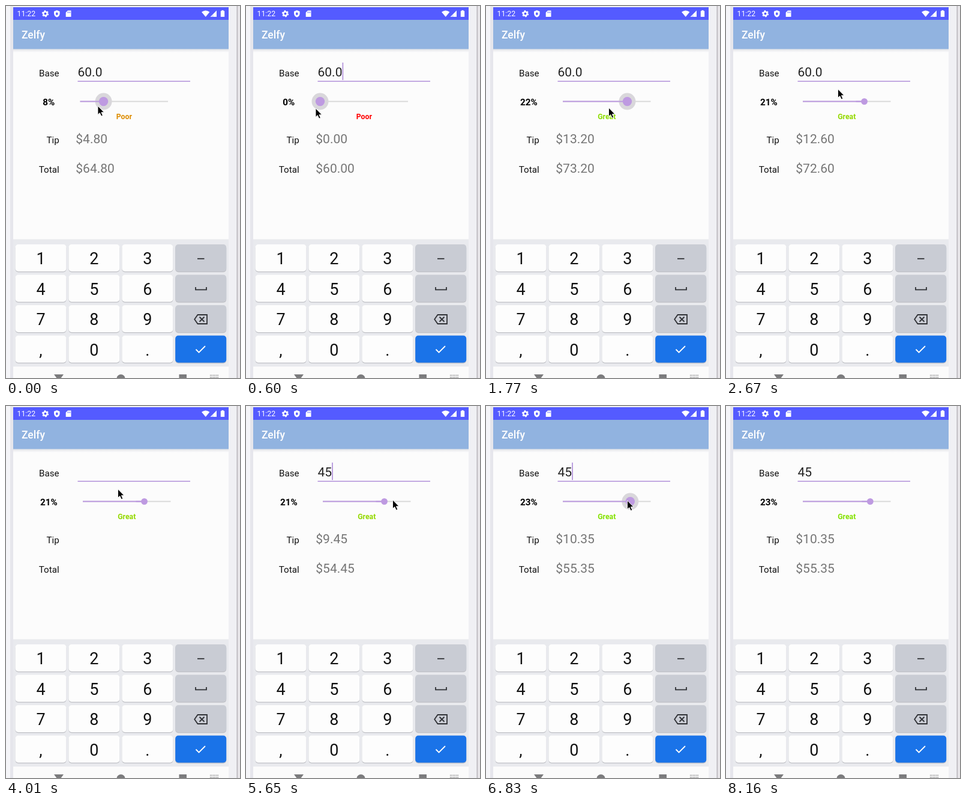
An HTML page for the animation above (8440 ms loop, 390 by 618 pixels).

```html
<!DOCTYPE html>
<html lang="en">
<head>
<meta charset="utf-8">
<title>Tip calculator</title>
<style>
html, body { margin: 0; width: 100%; height: 100%; overflow: hidden; background: #ececf1; }
svg { display: block; width: 390px; height: 618px; font-family: Roboto, sans-serif; }
.label { font-size: 15.2px; text-anchor: end; fill: #111; }
.value { font-size: 21px; fill: #757575; }
.bold { font-weight: 700; text-anchor: middle; }
.digit { font-size: 27px; text-anchor: middle; fill: #111; }
</style>
</head>
<body>
<svg viewBox="0 0 390 618">
  <defs>
    <linearGradient id="shade" x2="0" y2="1">
      <stop stop-color="#dfe1e6"/><stop offset="1" stop-color="#fcfcfc"/>
    </linearGradient>
  </defs>

  <!-- device edges and screen -->
  <rect width="390" height="618" fill="#f0f0f4"/>
  <rect width="7" height="618" fill="#f5f5f8"/>
  <rect x="7" width="5" height="618" fill="#e6e6ec"/>
  <rect x="384.5" width="2" height="618" fill="#b9b6bb"/>
  <rect x="386.5" width="3.5" height="618" fill="#e9e7ea"/>
  <rect x="12" y="2" width="359" height="616" fill="#fcfcfc"/>
  <rect x="12" y="71" width="359" height="6" fill="url(#shade)"/>
  <rect x="12" y="23" width="359" height="48.5" fill="#91b3e0"/>
  <rect x="12" y="2" width="359" height="21" fill="#545bff"/>

  <!-- status bar -->
  <g fill="#fff">
    <text x="18.5" y="17.3" font-size="12.3">11:22</text>
    <circle cx="65.5" cy="12.8" r="3.2" fill="none" stroke="#fff" stroke-width="2.4"/>
    <circle cx="65.5" cy="12.8" r="4.9" fill="none" stroke="#fff" stroke-width="1.6" stroke-dasharray="2.56 2.57"/>
    <path d="M84.8 7l4.8 2v3.6c0 3-2 5.300-4.800 6.200c-2.800-.9-4.800-3.200-4.800-6.200V9z"/>
    <path d="M84.800 10l2.200 3-2.200 2.800-2.200-2.800z" fill="#545bff"/>
    <path d="M103 7.500h5.500v10.500h-8.800V10.800z"/>
    <path d="M102.800 9.500v2.200m2-2.200v2.200m2-2.200v2.200" stroke="#545bff" stroke-width=".9"/>
    <path d="M326 10q6.700-5 13.400 0l-6.700 8z"/>
    <path d="M351 7.500v10.500h-10.500z"/>
    <path d="M346 13v5h-5z" fill="#dfe0ff"/>
    <path d="M359.500 7h3v1.200h1.700v9.800h-6.400V8.200h1.700z"/>
    <text x="26" y="54" font-size="17.500" font-weight="500">Zelfy</text>
  </g>

  <!-- form -->
  <text class="label" x="88.700" y="116.500">Base</text>
  <text class="label" x="88.700" y="228">Tip</text>
  <text class="label" x="88.700" y="277">Total</text>
  <text class="value" id="base" x="119.500" y="116.800" style="fill:#222"></text>
  <rect x="119.500" y="124.300" width="187.500" height="1.600" fill="#b596dc"/>
  <rect id="caret" y="94" width="1.800" height="29" fill="#b596dc"/>
  <text class="bold" id="percent" x="71.300" y="165" font-size="15.200" fill="#000"></text>
  <g id="slider">
    <rect y="157.600" width="146.500" height="1.900" fill="#d8d8d8"/>
    <rect id="fill" y="157.600" height="1.900" fill="#bb98e0"/>
    <circle id="ring" cy="158.600" r="14" fill="#d9d7db"/>
    <path id="over" stroke="#bb98e0" stroke-width="1.900"/>
    <circle id="thumb" cy="158.600" fill="#be9ae1"/>
    <text class="bold" id="rating" x="73.300" y="188" font-size="12.300"></text>
  </g>
  <text class="value" id="tip" x="116.300" y="228"></text>
  <text class="value" id="total" x="116.300" y="277"></text>

  <!-- keyboard -->
  <rect x="12" y="387.500" width="359" height="212" fill="#e9eaee"/>
  <g id="keys"></g>
  <g fill="none" stroke="#303236" stroke-width="1.800">
    <path d="M319 419.800h11.500"/>
    <path d="M316 467v4.300h18V467"/>
    <path d="M319.500 513h15.500v15h-15.500l-5.300-7.500z"/>
    <path d="M322.500 516.500l8 8m0-8l-8 8"/>
    <path d="M316.500 570.500l5 5 10.500-10.500" stroke="#fff"/>
  </g>

  <!-- navigation bar -->
  <rect x="12" y="599" width="359" height="19" fill="#fbfbfb"/>
  <g fill="#7b7b7d">
    <path d="M80 612h16l-8 11z"/>
    <circle cx="191.500" cy="619" r="7"/>
    <rect x="288.500" y="612" width="12.500" height="12"/>
    <path d="M340 613.500h14M340 616.800h14" stroke="#8b8b8d" stroke-width="1.500" stroke-dasharray="1.500 1"/>
  </g>

  <path id="mouse" d="M0 0V14.500L3.300 11.600 5.800 17 8.300 16 5.900 10.700H10.500Z" fill="#000" stroke="#fff" stroke-width=".9"/>
</svg>
<script>
const LOOP = 8440, STEP = 148.3;
const $ = id => document.getElementById(id);
const set = (id, attrs) => { for (const k in attrs) $(id).setAttribute(k, attrs[k]); };

// Keys are [step, value...]; values between keys are linear.
const percentKeys = [[0, 8], [2, 3], [4, 0], [5, 0], [6, 2], [7, 7], [8, 14], [9, 19], [10, 22], [12, 22],
  [13, 17], [14, 15], [15, 18], [16, 21], [39, 21], [40, 23], [42, 27], [43, 27], [46, 23]];
const mouseKeys = [[0, 153, 166], [3, 119, 169], [4, 116, 170], [5, 121, 170], [7, 175, 170], [8, 206, 170],
  [9, 232, 170], [11, 236, 170], [12, 204.5, 169], [13, 196, 170], [14, 203, 170], [16, 226, 169],
  [17, 214, 160], [18, 186.500, 138], [35, 186.500, 138], [36, 222, 149], [38, 244.500, 156], [39, 234, 158],
  [40, 241, 158], [42, 260, 158], [43, 258, 158], [46, 235.500, 157], [47, 235.500, 157], [48, 250, 200],
  [50, 294, 480], [51, 306, 606], [52, 310, 640]];

function at(keys, k) {
  const i = keys.findIndex(key => key[0] > k);
  if (i < 0) return keys[keys.length - 1].slice(1);
  const a = keys[i - 1], b = keys[i], f = (k - a[0]) / (b[0] - a[0]);
  return a.slice(1).map((v, j) => v + (b[j + 1] - v) * f);
}

function baseText(k) {
  if (k < 21) return '60.0';
  if (k < 23) return k < 22 ? '60' : '6';
  return k < 36 ? '' : k < 37 ? '4' : '45';
}

// The caret blinks every half second and restarts after an edit.
function caretOn(k) {
  const t = k * STEP;
  const since = k < 21 ? t - 100 : k < 23 ? 0 : k < 36 ? t - 3400 : k < 37 ? 0 : t - 5480;
  return Math.floor(since / 500) % 2 === 0;
}

function rating(p) {
  return p < 10 ? 'Poor' : p < 15 ? 'Acceptable' : p < 20 ? 'Good' : p < 25 ? 'Great' : 'Amazing';
}

function buildKeys() {
  const rows = ['123 ', '456 ', '789 ', ',0. '];
  let out = '';
  rows.forEach((row, r) => [...row].forEach((ch, c) => {
    const x = 15.5 + c * 88.900, y = 396 + r * 50.500;
    const color = c < 3 ? '#fdfdfd' : r < 3 ? '#c9ccd4' : '#1a73e8';
    const box = (dy, fill) => `<rect x="${x}" y="${y + dy}" width="85" height="45" rx="5" fill="${fill}"/>`;
    out += box(1.2, '#bfc0c5') + box(0, color) +
      `<text class="digit" x="${x + 42.500}" y="${y + 33.300}">${ch}</text>`;
  }));
  $('keys').innerHTML = out;
}

function draw(t) {
  const k = Math.floor((t + 12) / STEP);
  const p = Math.round(at(percentKeys, k)[0]);
  const [mx, my] = at(mouseKeys, k);
  const base = baseText(k), amount = +base, tip = amount * p / 100;
  const money = v => base ? '$' + v.toFixed(2) : '';
  const pressed = k < 17 || (k > 38 && k < 48);
  const x = p * 146.500 / 30;
  const mix = f => Math.round(255 * f ** (1 / 2.2));

  $('base').textContent = base;
  $('percent').textContent = p + '%';
  $('tip').textContent = money(tip);
  $('total').textContent = money(amount + tip);
  $('rating').textContent = rating(p);
  set('rating', { fill: `rgb(${mix(1 - p / 30)},${mix(p / 30)},0)` });
  set('slider', { transform: `translate(${p < 10 ? 123.500 : 128})` });
  set('fill', { width: x });
  set('ring', { cx: x, opacity: pressed ? 1 : k === 17 ? 0.4 : 0 });
  set('over', { d: `M${Math.max(0, x - 14)} 158.600H${x}` });
  set('thumb', { cx: x, r: pressed ? 7.700 : 5.400 });
  set('caret', { x: base ? 119.500 + $('base').getComputedTextLength() : 119.800, opacity: +caretOn(k) });
  set('mouse', { transform: `translate(${mx} ${my})` });
}

buildKeys();
const start = performance.now();
function tick() {
  draw((performance.now() - start) % LOOP);
  requestAnimationFrame(tick);
}
tick();
</script>
</body>
</html>
```
